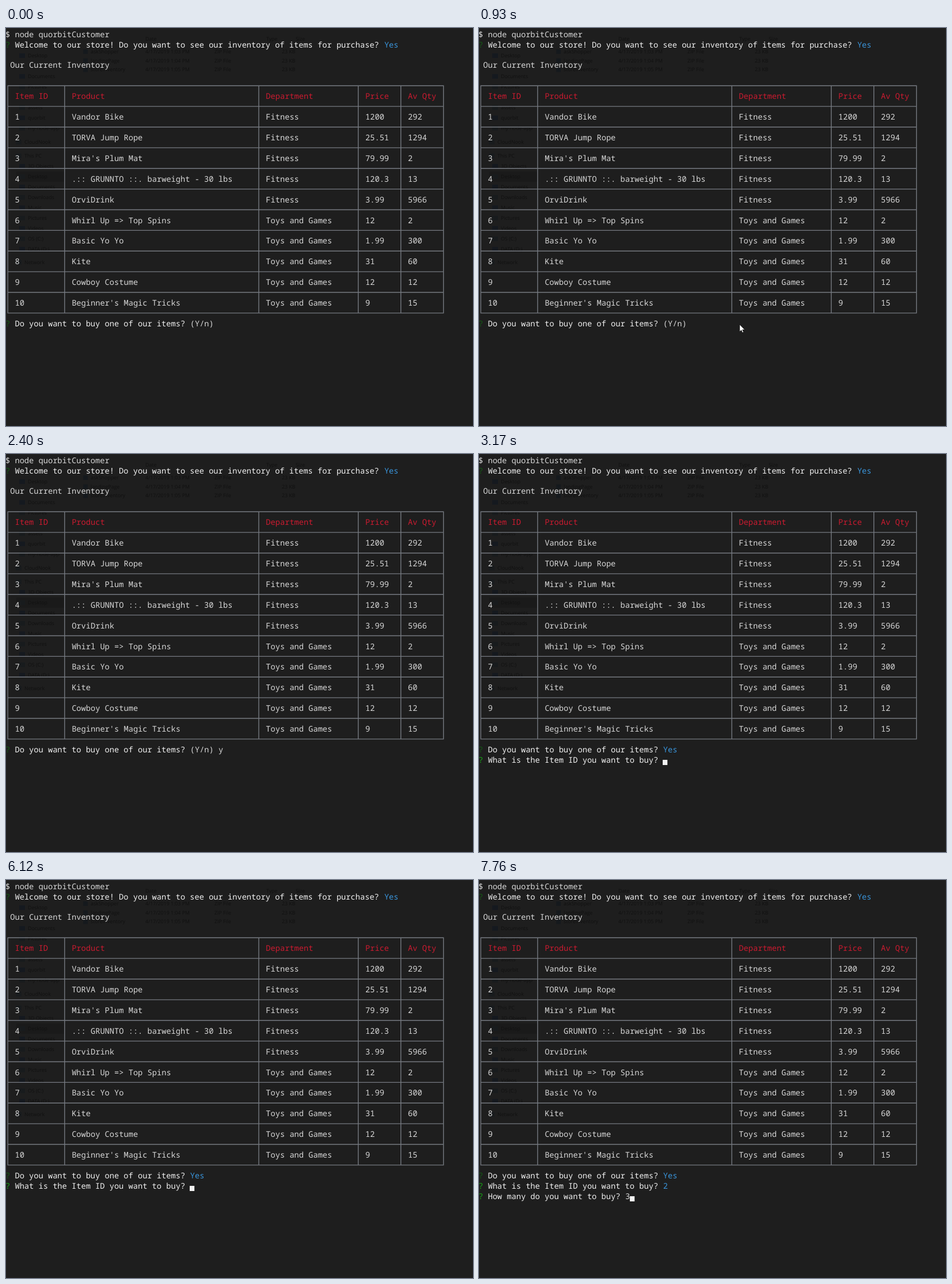
An HTML page that plays this animation: 811 px wide and 691 px high, repeating every 8000 ms.

```html
<!DOCTYPE html>
<html lang="en">
<head>
<meta charset="utf-8">
<title>Store console</title>
<style>
  html, body { margin: 0; width: 100%; height: 100%; overflow: hidden; background: #1e1e1e; }
  svg { display: block; width: 811px; height: 691px; }
  text { white-space: pre; text-rendering: geometricPrecision; }
  .term { font: 13.707px "Noto Sans Mono", monospace; }
  .ghost { font: 8.8px "Open Sans", sans-serif; fill: #111; }
</style>
</head>
<body>
<svg id="stage" viewBox="0 0 811 691" xmlns="http://www.w3.org/2000/svg"></svg>
<script>
const LOOP = 8000, CELL = 8.224, LINE = 17.94;
const WHITE = '#f2f2f2', GREY = '#d8d8d8', RED = '#cb1b30', BLUE = '#3a96dd';
const DIM = '#145a14', GREEN = '#16a414';
const stage = document.getElementById('stage');

function add(tag, attrs, content) {
  const el = document.createElementNS('http://www.w3.org/2000/svg', tag);
  for (const k in attrs) el.setAttribute(k, attrs[k]);
  if (content) el.textContent = content;
  return stage.appendChild(el);
}
const colX = col => col * CELL - 1;
const put = (row, col, str, fill) =>
  add('text', { class: 'term', x: colX(col), y: 15.6 + row * LINE, fill }, str);
const show = (el, on) => el.setAttribute('visibility', on ? 'visible' : 'hidden');

// Faint file window showing through the console
add('rect', { x: 0, y: 0, width: 811, height: 691, fill: '#1e1e1e' });
add('rect', { x: 18, y: 249, width: 84, height: 18, fill: '#1a1a1a' });
const ghost = (x, y, str) => add('text', { class: 'ghost', x, y: y + 3 }, str);
const folders = [
  [48, 'Desktop'], [84, 'Documents'], [102, 'Pictures'], [138, 'assets'], [156, 'quorbit'],
  [174, 'my-node-app'], [198, 'CloudNook'], [222, 'This PC'], [240, '3D Objects'],
  [258, 'Desktop'], [276, 'Documents'], [294, 'Downloads'], [312, 'Music'], [330, 'Pictures'],
  [348, 'Videos'], [366, 'OS (C:)'], [384, 'DATA (D:)'], [407, 'Network']
];
const outer = ['CloudNook', 'This PC', 'Network'];
for (const [y, name] of folders) {
  const left = outer.includes(name) ? 32 : 38;
  add('rect', { x: left - 15, y: y - 4, width: 10, height: 8, fill: y % 4 ? '#181b1d' : '#15191f' });
  ghost(left, y, name);
}
[[242, 'Date'], [452, 'Type'], [503, 'Size']].forEach(([x, s]) => ghost(x, 19, s));
['askShopper', 'landingPage', 'storeInventory'].forEach((name, i) => {
  const y = 41 + i * 15.7;
  add('rect', { x: 134, y: y - 4, width: 8, height: 8, fill: '#15191d' });
  ghost(147, y, name);
  ghost(242, y, '4/17/2019 1:0' + (3 + i) + ' PM');
  ghost(362, y, 'ZIP File');
  ghost(479, y, '23 KB');
});

// Table
const edges = [0, 12, 53, 74, 83, 92].map(c => colX(c + 0.5));
const rules = Array.from({ length: 12 }, (_, i) => 100.2 + i * 2 * LINE);
const grid = rules.map(y => `M${edges[0]} ${y}H${edges[5]}`)
  .concat(edges.map(x => `M${x} ${rules[0]}V${rules[11]}`)).join('');
add('path', { d: grid, fill: 'none', stroke: '#757980', 'stroke-width': 1.4, 'stroke-linecap': 'square' });

const FIT = 'Fitness', TOYS = 'Toys and Games';
const table = [
  ['Item ID', 'Product', 'Department', 'Price', 'Av Qty'],
  ['1', 'Vandor Bike', FIT, '1200', '292'],
  ['2', 'TORVA Jump Rope', FIT, '25.51', '1294'],
  ['3', "Mira's Plum Mat", FIT, '79.99', '2'],
  ['4', '.:: GRUNNTO ::. barweight - 30 lbs', FIT, '120.3', '13'],
  ['5', 'OrviDrink', FIT, '3.99', '5966'],
  ['6', 'Whirl Up => Top Spins', TOYS, '12', '2'],
  ['7', 'Basic Yo Yo', TOYS, '1.99', '300'],
  ['8', 'Kite', TOYS, '31', '60'],
  ['9', 'Cowboy Costume', TOYS, '12', '12'],
  ['10', "Beginner's Magic Tricks", TOYS, '9', '15']
];
const starts = [2, 14, 55, 76, 85];
table.forEach((cells, i) =>
  cells.forEach((s, j) => put(6 + 2 * i, starts[j], s, i ? GREY : RED)));

// Fixed lines
put(0, 0, '$ node quorbitCustomer', GREY);
put(1, 0, '?', DIM);
put(1, 2, 'Welcome to our store! Do you want to see our inventory of items for purchase?', WHITE);
put(1, 80, 'Yes', BLUE);
put(3, 1, 'Our Current Inventory', GREY);
put(28, 0, '?', DIM);
put(28, 2, 'Do you want to buy one of our items?', WHITE);

// Parts that appear for a span of time: [element, from, to]
const timed = [
  [put(28, 39, '(Y/n)', GREY), 0, 3170],
  [put(28, 45, 'y', GREY), 2400, 3170],
  [put(28, 39, 'Yes', BLUE), 3170, LOOP],
  [put(29, 0, '?', GREEN), 3170, LOOP],
  [put(29, 2, 'What is the Item ID you want to buy?', WHITE), 3170, LOOP],
  [put(29, 39, '2', GREY), 6440, 6820],
  [put(29, 39, '2', BLUE), 6820, LOOP],
  [put(30, 0, '?', GREEN), 6820, LOOP],
  [put(30, 2, 'How many do you want to buy?', WHITE), 6820, LOOP],
  [put(30, 31, '3', GREY), 7760, LOOP]
];

// Caret: [from, to, row, col]
const blinks = [
  [1320, 1860, 28, 45], [2940, 3170, 28, 46],
  [3170, 3470, 29, 39], [4010, 4480, 29, 39], [5030, 5580, 29, 39], [6120, 6440, 29, 39],
  [6440, 6660, 29, 40], [6820, 7130, 30, 31], [7670, 7760, 30, 31], [7760, LOOP, 30, 32]
];
const caret = add('rect', { width: 8.2, height: 9, fill: '#f2f2f2' });

// Pointer: an eased glide in, then a swing down and back up
const hops = [];
for (let i = 0; i < 8; i++) {
  const left = Math.pow(1 - i / 7, 1.6);
  hops.push([i < 7 ? 380 + 78 * i : 925, 452 + 229 * left, 514 + 137 * left]);
}
hops.push([1010, 446, 508], [1080, 440, 505], [1160, 434, 513],
  [1240, 425, 540], [1320, 405, 585], [1390, 380, 622], [1460, 358, 636],
  [1540, 348, 622], [1700, 364, 530], [1780, 379, 520]);
const POINTER_END = 1860;
const pointer = add('path', {
  d: 'M0 0V12.6L2.9 9.9L4.8 14.2L6.9 13.3L5 9.1H9Z',
  fill: '#fff', stroke: '#000', 'stroke-width': 0.7
});

function draw(t) {
  for (const [el, from, to] of timed) show(el, t >= from && t < to);

  const blink = blinks.find(b => t >= b[0] && t < b[1]);
  show(caret, blink);
  if (blink) {
    caret.setAttribute('x', Math.round(colX(blink[3]) - 0.4));
    caret.setAttribute('y', 513 + 18 * (blink[2] - 28));
  }

  const hop = t < POINTER_END && hops.filter(h => h[0] <= t).pop();
  show(pointer, hop);
  if (hop) pointer.setAttribute('transform', `translate(${hop[1] + 0.6} ${hop[2] + 0.8})`);
}

let begin;
function tick(now) {
  if (begin === undefined) begin = now;
  draw((now - begin) % LOOP);
  requestAnimationFrame(tick);
}
draw(0);
requestAnimationFrame(tick);
</script>
</body>
</html>
```
